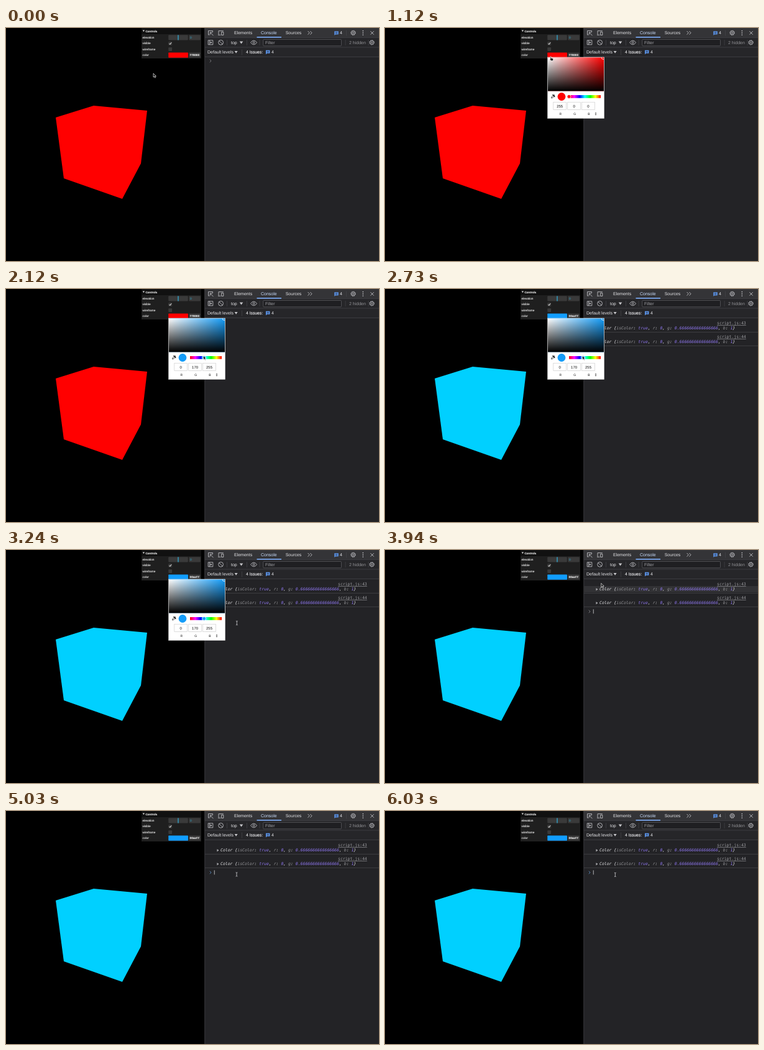
These frames come from a looping animation (600 by 375 pixels, 6060 ms). An HTML page:

```html
<!DOCTYPE html>
<html lang="en">
<head>
<meta charset="utf-8">
<title>Cube colour console</title>
<style>
  html, body { margin: 0; width: 100%; height: 100%; overflow: hidden; background: #000; }
  svg { display: block; width: 100vw; height: 100vh; }
  text { font: 7px "Liberation Sans", Arial, sans-serif; fill: #e3e3e6; text-rendering: geometricPrecision; white-space: pre; }
  .gui text { font-size: 4.75px; fill: #ebebeb; stroke: #ebebeb; stroke-width: .12px; }
  .gui .mono { font: bold 4.25px "DejaVu Sans Mono", monospace; }
  .gui .cyan { fill: #2cb4dd; stroke: none; }
  .field { fill: #3a3a3a; }
  .line { stroke: #47474b; stroke-width: .7; fill: none; }
  .icon { stroke: #c7c7cb; stroke-width: .85; fill: none; }
  .solid { fill: #c7c7cb; }
  .blue { fill: #5f9bf5; }
  .dim { fill: #929296; }
  .log text { font: 6.47px "DejaVu Sans Mono", monospace; }
  .log .obj { font-style: italic; }
  .log .key { fill: #96969a; }
  .log .val { fill: #8f77f0; }
  .log .link { fill: #9b9b9f; text-decoration: underline; }
  .picker text { font-size: 6px; fill: #111; text-anchor: middle; }
  .picker .label { font-size: 5px; }
  .box { fill: #fff; stroke: #cfcfcf; stroke-width: .7; }
</style>
</head>
<body>
<svg viewBox="0 0 600 375" preserveAspectRatio="none">
  <defs>
    <linearGradient id="white"><stop stop-color="#fff"/><stop offset="1" stop-color="#fff" stop-opacity="0"/></linearGradient>
    <linearGradient id="black" x2="0" y2="1"><stop stop-color="#000" stop-opacity="0"/><stop offset="1"/></linearGradient>
    <linearGradient id="hues"></linearGradient>
    <clipPath id="fieldClip"><rect x="262" y="47.5" width="90" height="54"/></clipPath>
    <g id="gear">
      <circle r="3.1" class="icon" stroke-width="1"/>
      <circle r="3.7" class="icon" stroke-dasharray="1.45 1.45"/>
      <circle r="1.2" class="icon"/>
    </g>
    <g id="chat">
      <path d="M0 0h6.4v5h-4.6L0 6.6z" class="blue"/>
      <path d="M1.4 1.7h3.6M1.4 3.3h3.6" stroke="#222" stroke-width=".7"/>
    </g>
  </defs>

  <rect width="600" height="375"/>
  <path id="cube" d="M141 125L227 133L217 218L187 275L93 242L80 144Z"/>

  <!-- settings panel -->
  <g class="gui">
    <rect x="218" width="96" height="49" fill="#1f1f1f"/>
    <rect x="218" width="96" height="10" fill="#111"/>
    <path d="M219.8 3.6h3.2l-1.6 2.5z" fill="#ebebeb"/>
    <text x="224.5" y="6.5" font-weight="bold" style="font-weight:bold;font-size:4.6px">Controls</text>
    <text x="219.5" y="16.8">elevation</text>
    <text x="219.5" y="26.3">visible</text>
    <text x="219.5" y="35.8">wireframe</text>
    <text x="219.5" y="45.2">color</text>
    <rect class="field" x="261.3" y="11.3" width="31.5" height="8.2" rx="1"/>
    <rect x="276.5" y="11.3" width="1" height="8.2" fill="#2cc9ff"/>
    <rect class="field" x="294.3" y="11.3" width="18.5" height="8.2" rx="1"/>
    <text class="cyan" x="296" y="17">0</text>
    <rect class="field" x="261.3" y="22" width="5.8" height="5.8" rx="1"/>
    <path d="M262.5 25l1.3 1.4l2.3-3" stroke="#fff" stroke-width="1" fill="none"/>
    <rect class="field" x="261.3" y="31.2" width="5.8" height="5.8" rx="1"/>
    <rect id="swatch" x="261.3" y="39.5" width="31.7" height="8.2" rx=".8"/>
    <rect class="field" x="294.3" y="39.5" width="18.5" height="8.2" rx="1"/>
    <text id="hex" class="mono" x="295.6" y="45.2"></text>
  </g>

  <!-- developer panel -->
  <rect x="319.5" width="280.5" height="375" fill="#232326"/>
  <rect x="319.5" width="280.5" height="15.5" fill="#343437"/>
  <rect x="319.5" y="15.5" width="280.5" height="31" fill="#262629"/>
  <path class="line" d="M319.8 0V375M320 15.6H600M320 31H600M320 46.5H600M355.5 19v9M387.5 19v9M408 19v9M379.5 34.5v9M546 19v9M583 19v9"/>
  <rect x="403.5" y="14" width="39.5" height="1.6" fill="#7cacf8"/>

  <path class="icon" d="M327.5 11h-2v-6.5h7v2.2M328.5 7.2l5 5M328.3 10.6v-3.6h3.6" stroke-dasharray="none"/>
  <path class="icon" d="M342 10.5V4.6h7.8M341 11.2h4.4M346.6 6.5h3.2v4.9h-3.2z"/>
  <text x="367" y="10.2">Elements</text>
  <text x="410" y="10.2" style="fill:#c9dcfb">Console</text>
  <text x="449.7" y="10.2">Sources</text>
  <path class="icon" d="M485.5 5l2.8 2.8l-2.8 2.8M489.3 5l2.8 2.8l-2.8 2.8"/>
  <use href="#chat" x="528.3" y="5.2"/>
  <text x="537" y="10.4">4</text>
  <path class="line" d="M547.5 3.5v9"/>
  <use href="#gear" x="558.5" y="7.8"/>
  <g class="solid"><circle cx="574.3" cy="4.6" r=".85"/><circle cx="574.3" cy="7.8" r=".85"/><circle cx="574.3" cy="11" r=".85"/></g>
  <path class="icon" d="M586.3 5.2l5.4 5.4M591.7 5.2l-5.4 5.4"/>

  <path class="icon" d="M325.2 19.8h7.6v7h-7.6zM327.4 19.8v7"/>
  <path class="solid" d="M328.8 21.4l2.6 1.9l-2.6 1.9z"/>
  <circle class="icon" cx="345.6" cy="23.3" r="3.9"/>
  <path class="icon" d="M342.9 20.6l5.4 5.4"/>
  <text x="362" y="25.8">top</text>
  <path class="solid" d="M375.7 21.6h5.6l-2.8 4z"/>
  <path class="icon" d="M393.5 23.4q5-6.6 10.2 0q-5.2 6.6-10.2 0z"/>
  <circle class="icon" cx="398.6" cy="23.4" r="1.5"/>
  <rect x="413.7" y="18.4" width="125.8" height="10.4" rx="1.2" fill="#1f1f22" stroke="#5b5b60" stroke-width=".8"/>
  <text x="417" y="26" class="dim" style="fill:#a0a0a4">Filter</text>
  <text x="552" y="25.8" class="dim">2 hidden</text>
  <use href="#gear" x="588.5" y="23.3"/>

  <text x="324" y="41">Default levels</text>
  <path class="solid" d="M367.6 37h5l-2.5 3.8z"/>
  <text x="386" y="41" style="font-size:6.75px;stroke:#e3e3e6;stroke-width:.15px">4 Issues:</text>
  <use href="#chat" x="418" y="35.8"/>
  <text x="427" y="41">4</text>

  <rect id="hover" x="320.2" y="58" width="279.8" height="10" fill="#323235"/>
  <g id="logs" class="log"></g>
  <path id="prompt" d="M327.8 -2.3l2.2 2.3l-2.2 2.3" fill="none" stroke-width=".85"/>
  <rect id="caret" x="334.8" y="95.4" width=".8" height="7" fill="#d8d8db"/>

  <!-- colour picker -->
  <g id="picker" class="picker">
    <rect x="261.5" y="47" width="91" height="98.5" fill="#fff" stroke="#c8c8c8" stroke-width=".6"/>
    <rect id="shade" x="262" y="47.5" width="90" height="54"/>
    <rect x="262" y="47.5" width="90" height="54" fill="url(#white)"/>
    <rect x="262" y="47.5" width="90" height="54" fill="url(#black)"/>
    <circle cx="351" cy="47.5" r="2.8" fill="none" stroke="#fff" stroke-width=".8" clip-path="url(#fieldClip)"/>
    <path d="M267.6 112.8l.4-1.8l2.6-2.6l1.4 1.4l-2.6 2.6z" fill="none" stroke="#111" stroke-width=".8"/>
    <path d="M270 107.6l2.8 2.8M271.2 109l1.1-1.1" stroke="#111" stroke-width="1.4" stroke-linecap="round"/>
    <circle id="sample" cx="284" cy="110.5" r="6.4"/>
    <rect x="296" y="108" width="51" height="4.8" fill="url(#hues)"/>
    <circle id="knob" cy="110.4" r="3" stroke="#fff" stroke-width=".8"/>
    <g id="inputs"></g>
    <path d="M337.7 137.4l1.3-1.6l1.3 1.6zM337.7 138.8l1.3 1.6l1.3-1.6z" fill="#333"/>
  </g>

  <g id="pointer">
    <path id="arrow" d="M0 0V6.2L1.5 4.9L2.5 7.2L3.6 6.7L2.6 4.5H4.5Z" fill="#111" stroke="#fff" stroke-width=".65"/>
    <path id="hand" d="M0 0q.9-.8 1.3 .2v2.2l2.8 .6q.8 .2 .6 1.2l-.6 2.6h-3l-2.2-2.8q.2-1 1.1-.2z" fill="#111" stroke="#fff" stroke-width=".65"/>
    <path id="beam" d="M-1.4 -3.2q1.4 0 1.4 .8q0-.8 1.4-.8M0 -2.4V2.4M-1.4 3.2q1.4 0 1.4-.8q0 .8 1.4 .8" fill="none" stroke="#d5d5d8" stroke-width=".8"/>
  </g>
</svg>

<script>
const LOOP = 6060;
const OPEN = 960, GRAB = 1560, COMMIT = 2270, CLOSE = 3420;
const HUE_LEFT = 296, HUE_WIDTH = 51;
const RED = [255, 0, 0];

// time, x, y of the pointer tip
const PATH = [
  [0, 237, 73], [280, 237, 73], [760, 266, 46], [1250, 266, 46],
  [1560, 309, 109], [1950, 317.6, 107.5], [2850, 317.6, 107.5],
  [3300, 374, 118], [3480, 374, 118], [3820, 347.5, 53.5], [4080, 348, 53.5],
  [4480, 362, 78], [4900, 371, 102], [5300, 371, 102], [5700, 370.3, 102.5], [LOOP, 370.3, 102.5]
];

const $ = id => document.getElementById(id);
const rgb = c => `rgb(${c.join(",")})`;
const show = (id, on) => $(id).setAttribute("visibility", on ? "visible" : "hidden");
const fill = (id, color) => $(id).setAttribute("fill", color);

const span = (kind, s) => `<tspan class="${kind}">${s}</tspan>`;
const pair = (key, value) => `${span("key", key)}: ${span("val", value)}`;
const object = "Color {" + [
  pair("isColor", "true"), pair("r", "0"), pair("g", "0." + "6".repeat(16)), pair("b", "1")
].join(", ") + "}";

$("logs").innerHTML = [43, 44].map((line, i) => `
  <g transform="translate(0 ${i * 22})">
    <path class="line" d="M320 69.5H600"/>
    <text class="link" x="534" y="57.2">script.js:${line}</text>
    <path d="M339.4 61.2v4.2l3.2-2.1z" fill="#a5a5a9"/>
    <text class="obj" x="345" y="65.3">${object}</text>
  </g>`).join("");

$("inputs").innerHTML = ["R", "G", "B"].map((name, i) => {
  const x = 281.2 + i * 22.9;
  return `<rect class="box" x="${x - 10.4}" y="119.3" width="20.8" height="12.2"/>
    <text class="num" x="${x}" y="127.6"></text>
    <text class="label" x="${x + 1}" y="139.9">${name}</text>`;
}).join("");
const numbers = document.querySelectorAll(".num");

$("hues").innerHTML = [360, 300, 240, 180, 120, 60, 0]
  .map((h, i) => `<stop offset="${i / 6}" stop-color="hsl(${h},100%,50%)"/>`).join("");

function hueColor(hue) {
  return [5, 3, 1].map(n => {
    const k = (n + hue / 60) % 6;
    return Math.round(255 * (1 - Math.max(0, Math.min(k, 4 - k, 1))));
  });
}

function pointerAt(t) {
  const i = Math.max(1, PATH.findIndex(p => p[0] > t));
  const [t0, x0, y0] = PATH[i - 1], [t1, x1, y1] = PATH[i];
  const u = (t - t0) / (t1 - t0), e = u * u * (3 - 2 * u);
  return [x0 + (x1 - x0) * e, y0 + (y1 - y0) * e];
}

function draw(t) {
  const [x, y] = pointerAt(t);
  const open = t >= OPEN && t < CLOSE, done = t >= COMMIT, focused = t >= CLOSE;

  let hue = 360;
  if (t >= GRAB) hue = t < 1950 ? 360 * (1 - (x + .07 - HUE_LEFT + 1) / HUE_WIDTH) : 200;
  const picked = t >= GRAB ? hueColor(hue) : RED;

  fill("cube", done ? "#00d0ff" : "#f00");
  fill("swatch", done ? "#119dff" : "#f00");
  $("hex").textContent = done ? "00aaff" : "ff0000";

  show("picker", open);
  const tone = t >= 1950 ? "#149cf8" : rgb(picked);
  ["shade", "sample", "knob"].forEach(id => fill(id, tone));
  $("knob").setAttribute("cx", HUE_LEFT + HUE_WIDTH * (1 - hue / 360));
  numbers.forEach((n, i) => { n.textContent = picked[i]; });

  show("logs", done);
  show("hover", focused && y > 48 && y < 69);
  show("caret", focused);
  $("prompt").setAttribute("transform", `translate(0 ${done ? 99 : 53})`);
  $("prompt").setAttribute("stroke", focused && y > 92 ? "#5c8fc4" : "#85858a");

  const beam = x > 353 && y > 92;
  const hand = !beam && t > 700 && y > 39 && y < 48;
  show("beam", beam);
  show("hand", hand);
  show("arrow", !beam && !hand);
  $("pointer").setAttribute("transform", `translate(${x} ${y})`);
}

const start = performance.now();
function tick() {
  draw((performance.now() - start) % LOOP);
  requestAnimationFrame(tick);
}
tick();
</script>
</body>
</html>
```
